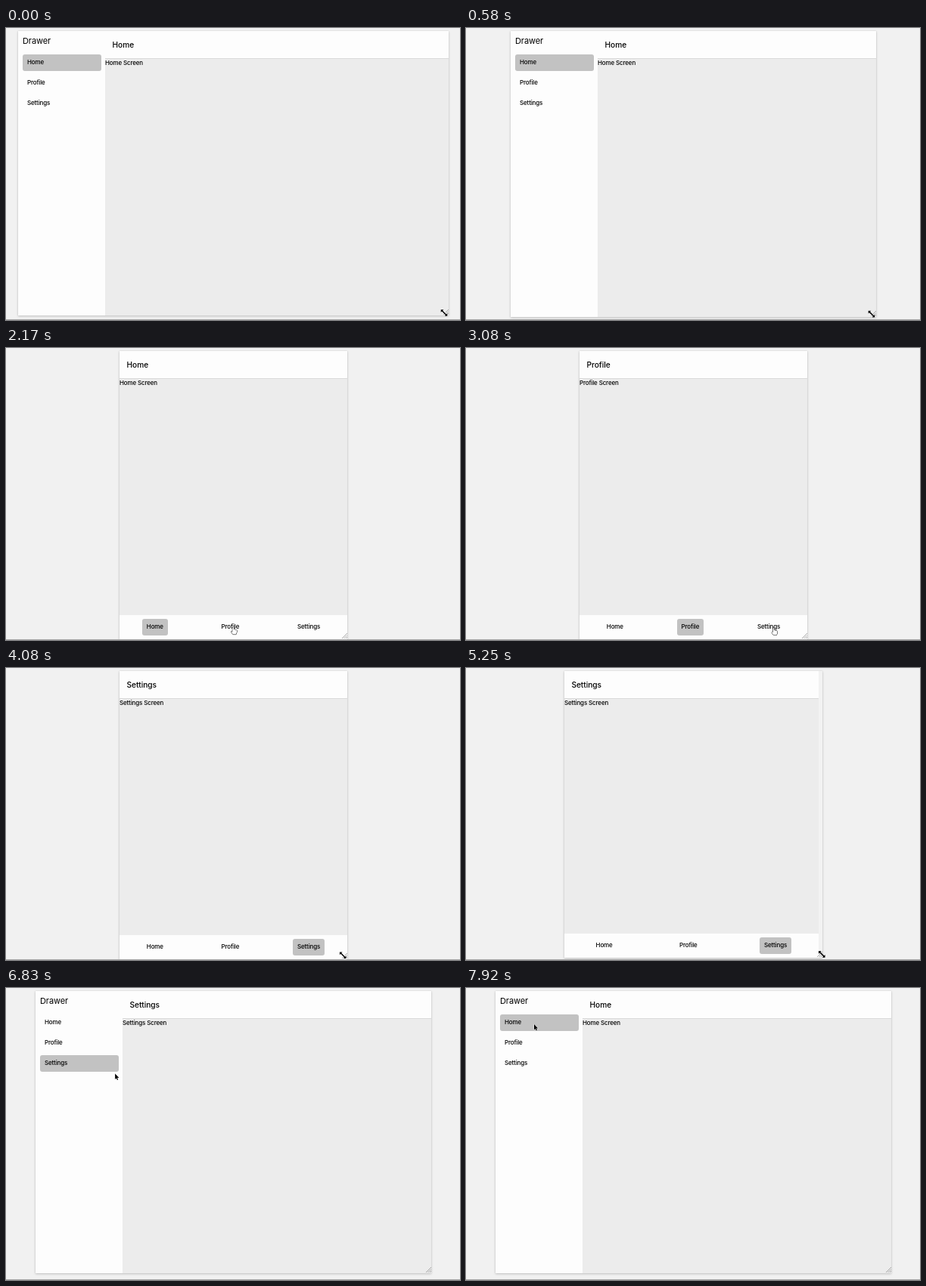
An HTML page that plays this animation: 600 by 387 pixels, repeating every 8 s.

```html
<!DOCTYPE html>
<html lang="en">
<head>
<meta charset="utf-8">
<title>Responsive navigation</title>
<style>
  html, body { margin: 0; width: 100%; height: 100%; overflow: hidden; background: #f1f1f1; }
  body { position: relative; font: 500 8px/10px Inter, sans-serif; letter-spacing: -.15px; color: #000; cursor: default; }
  .floor { position: absolute; left: 0; right: 0; top: 386px; height: 1px; background: #a6a6a6; }
  .window {
    position: absolute; top: 4px; overflow: hidden; background: #f2f2f2;
    box-shadow: 0 1px 3px rgba(0, 0, 0, .2), 0 0 1px rgba(0, 0, 0, .14);
  }
  .app { position: absolute; left: 0; top: 0; height: 100%; background: #ececec; }
  .side { position: absolute; left: 0; top: 0; bottom: 0; width: 115px; background: #fdfdfd; }
  .side h1 { position: absolute; left: 6px; top: 6px; margin: 0; font: 400 11px/14px Inter, sans-serif; letter-spacing: -.1px; }
  .main { position: absolute; left: 115px; right: 0; top: 0; bottom: 0; }
  .header {
    height: 36px; padding-left: 9.5px; background: #fdfdfd; border-bottom: 1px solid #d9d9d9;
    font: 500 10.2px/37px Inter, sans-serif; letter-spacing: -.05px;
  }
  .item { box-sizing: border-box; height: 21.5px; padding: 0 6px; border-radius: 3px; line-height: 21.5px; }
  .item.active { background: #c2c2c2; }
  .side .item { position: absolute; left: 6px; width: 103.5px; }
  .tabs {
    position: absolute; left: 0; right: 0; bottom: 0; height: 32px; background: #fdfdfd;
    display: flex; justify-content: space-around; align-items: center; gap: 5px;
  }
  .narrow .side, .app:not(.narrow) .tabs { display: none; }
  .narrow .main { left: 0; }
  .grip { position: absolute; right: 0; bottom: 1px; }
  .pointer { position: absolute; left: 0; top: 0; overflow: visible; }
  .pointer path { stroke-linejoin: round; paint-order: stroke; }
</style>
</head>
<body>
<div class="window">
  <div class="app">
    <div class="side"><h1>Drawer</h1></div>
    <div class="main">
      <div class="header"></div>
      <div class="screen"></div>
    </div>
    <div class="tabs"></div>
  </div>
  <svg class="grip" width="7" height="7" fill="none">
    <path d="M0 7L7 0M2.5 7L7 2.5M5 7L7 5" stroke="#999" stroke-width=".8"/>
  </svg>
</div>
<div class="floor"></div>
<svg class="pointer" width="1" height="1"><path/></svg>

<script>
const DURATION = 8000, TICK = 1000 / 12, BREAKPOINT = 342;
const PAGES = ["Home", "Profile", "Settings"];
const find = selector => document.querySelector(selector);
const frame = find(".window"), app = find(".app"), pointer = find(".pointer path");

const SHAPES = {
  resize: { d: "M-4.3 -4.3H-.6L-1.9 -3L3 1.9L4.3 .6V4.3H.6L1.9 3L-3 -1.9L-4.3 -.6Z", fill: "#000", stroke: "#fff" },
  arrow: { d: "M0 0V7.4L1.7 5.9L2.8 8.4L4 7.9L2.9 5.4H5.2Z", fill: "#000", stroke: "#fff" },
  hand: {
    d: "M-2.2 1V-4.2Q-1.3 -5.8 -.5 -4.2V-2L3 -1.2Q3.8 -1 3.6 1L2.5 4.6H-1.6L-4 1Q-3.8 -.2 -2.2 1ZM-.4 1V3.4M1.6 1V3.4",
    fill: "#fff", stroke: "#000",
  },
};

// Pointer trips in ticks; a page opens on click.
const TRIPS = [
  { leave: 21, arrive: 26, to: () => [301.5, 375], shape: "hand", click: 29, page: 1 },
  { leave: 31, arrive: 39, to: () => [415, 376], shape: "hand", click: 42, page: 2 },
  { leave: 44, arrive: 52, to: ({ right, bottom }) => [right - .8, bottom - 4.5], shape: "resize" },
  { leave: 76, arrive: 85, to: () => [92, 81], shape: "arrow", click: 84, page: 1 },
  { leave: 88, arrive: 94, to: () => [90, 48], shape: "arrow", click: 93, page: 0 },
];

const progress = (t, start, end) => Math.min(1, Math.max(0, (t - start) / (end - start)));
const smooth = k => k * k * (3 - 2 * k);
const easeOut = k => 1 - (1 - k) ** 2;

function windowAt(t) {
  const shrink = smooth(progress(t, 0, 18.5));
  const grow = progress(t, 61.1, 71.6);
  const settle = progress(t, 71, 73);
  const left = 16 + 134 * shrink - 111 * grow;
  const right = 601 - left;
  return { left, right, width: right - left, bottom: 381 + 5 * shrink - 12 * grow + 4 * settle };
}

function pointerAt(t, box) {
  let x = box.right - 6, y = box.bottom - 3.5, shape = "resize";
  for (const trip of TRIPS.filter(trip => t > trip.leave)) {
    const k = easeOut(progress(t, trip.leave, trip.arrive));
    const [toX, toY] = trip.to(box);
    x += (toX - x) * k;
    y += (toY - y) * k;
    shape = k > .75 ? trip.shape : "arrow";
  }
  return { x, y, shape };
}

function addItem(parent, label, top) {
  const item = document.createElement("div");
  item.className = "item";
  item.textContent = label;
  if (top !== undefined) item.style.top = top + "px";
  parent.append(item);
  return item;
}

const links = PAGES.map((label, i) => [
  addItem(find(".side"), label, 31 + 27 * i),
  addItem(find(".tabs"), label),
]);

function render(time) {
  // The picture advances in twelve steps per second.
  const t = Math.floor((time % DURATION + 4) / TICK);
  const box = windowAt(t), narrow = box.width < BREAKPOINT;

  frame.style.left = box.left + "px";
  frame.style.width = box.width + "px";
  frame.style.height = box.bottom - 4 + "px";
  // The tab layout trails the dragged corner slightly.
  app.style.width = (narrow ? windowAt(t - .25) : box).width + "px";
  app.classList.toggle("narrow", narrow);

  const page = TRIPS.findLast(trip => t >= trip.click)?.page ?? 0;
  find(".header").textContent = PAGES[page];
  find(".screen").textContent = PAGES[page] + " Screen";
  links.forEach((pair, i) => pair.forEach(item => item.classList.toggle("active", i === page)));

  const { x, y, shape } = pointerAt(t, box);
  const look = { ...SHAPES[shape], transform: `translate(${x} ${y})` };
  for (const name in look) pointer.setAttribute(name, look[name]);
}

const start = performance.now();
function loop() {
  render(performance.now() - start);
  requestAnimationFrame(loop);
}
loop();
</script>
</body>
</html>
```
